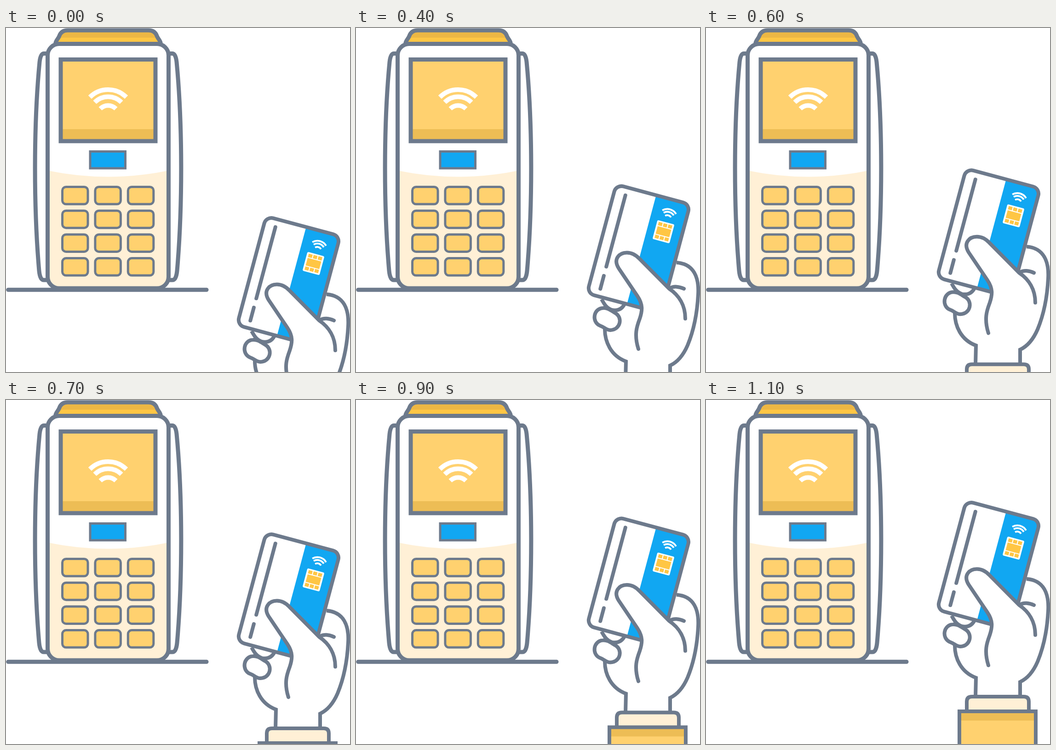
Write an HTML page that moves like this. It is 748 px wide and 748 px high and loops after 2.1 s.

```html
<!DOCTYPE html>
<html lang="en">
<head>
<meta charset="utf-8">
<title>Contactless payment</title>
<style>
  html, body { margin: 0; height: 100%; overflow: hidden; background: #fff; }
  svg { display: block; width: 100vw; height: 100vh; }
  .line { stroke: #6d7a8c; stroke-width: 9; fill: none; }
  .thin { stroke-width: 5; }
  .white { fill: #fff; }
  .cream { fill: #fff0d6; }
  .yellow { fill: #ffd16f; }
  .amber { fill: #edbd55; }
  .blue { fill: #11a7f2; }
  .round { stroke-linecap: round; stroke-linejoin: round; }
  #hand .line { stroke-width: 8; }
</style>
</head>
<body>
<svg viewBox="0 0 748 748">
  <defs>
    <path id="flap" class="line white" d="M92 55.500H82Q75 56 73 74C60 210 60 390 72 528Q74 548 82 548H92"/>
    <g id="waves" fill="none" stroke="#fff" stroke-width="10">
      <path d="M-39.600-39.600A56 56 0 0 1 39.600-39.600"/>
      <path d="M-29-28.500A41 41 0 0 1 29-28.500"/>
      <path d="M-17-14.500A24 24 0 0 1 17-14.500"/>
    </g>
    <path id="cap" d="M107.500 36C107 27 114 24 116 17C119 9 125 5 134 5H310C319 5 325 9 328 17C330 24 337 27 336.500 36"/>
    <clipPath id="capTop"><rect width="444" height="21"/></clipPath>
  </defs>

  <g id="terminal">
    <use href="#cap" fill="#ffc644"/>
    <use href="#cap" fill="#edb744" clip-path="url(#capTop)"/>
    <use href="#cap" class="line"/>
    <use href="#flap"/>
    <use href="#flap" transform="matrix(-1 0 0 1 444 0)"/>
    <rect class="white" x="90.500" y="34.500" width="263" height="531" rx="25"/>
    <path class="cream" d="M91 310Q222 337 353 310V541Q353 566 328 566H116Q91 566 91 541Z"/>
    <rect class="line" x="90.500" y="34.500" width="263" height="531.500" rx="25"/>
    <rect class="yellow" x="119" y="68.500" width="206" height="177.500"/>
    <rect class="amber" x="119" y="220" width="206" height="24"/>
    <rect class="line" x="119" y="68.500" width="206" height="177.500"/>
    <use href="#waves" x="222" y="190"/>
    <rect class="line thin blue" x="183" y="268.500" width="76.500" height="36.500"/>
    <g id="keys"></g>
    <path class="line round" d="M4.800 569.200H436"/>
  </g>

  <g id="hand">
    <path class="line white" d="M697 389C735 392 746 422 744 458C742 500 735 535 721 569C711 592 698 606 683 613V647H586L587 604C555 592 540 562 541 530L560 470"/>
    <path class="line round" d="M683 445C690 440 703 441 713 446"/>
    <path class="line white" d="M534 469C540 480 545 488 556 492C570 495 580 490 586 475"/>
    <path class="line white" d="M537 488C548 487 555 494 564 499C580 508 576 535 553 536C544 536 541 530 530 526C512 518 516 489 537 488Z"/>

    <g transform="translate(565.700 219.400) rotate(15)">
      <rect class="white" width="166.600" height="245" rx="16"/>
      <path class="blue" d="M90 0H150.600Q166.600 0 166.600 16V229Q166.600 245 150.600 245H90Z"/>
      <rect class="line" width="166.600" height="245" rx="16"/>
      <path class="line round" d="M25.500 17.500V178M25.500 198.700V228"/>
      <use href="#waves" transform="translate(127 43.700) scale(.39)"/>
      <rect class="white" x="106.800" y="51.300" width="38.200" height="42.500" rx="3"/>
      <g id="chip" fill="#ffc644"></g>
    </g>

    <path class="line white round" d="M614 577C604 545 611 527 617 511C623 493 624 480 612 462L571.500 402C558 381 573 367.500 589 367.500C600 367.500 608 372 616 380.500L681 446C702 460 716 482 716 511"/>
    <path class="line cream" d="M567 678V656Q567 645 578 645H691Q702 645 702 656V678"/>
    <rect class="yellow" x="551" y="677" width="166" height="90"/>
    <rect class="amber" x="551" y="677" width="166" height="20"/>
    <rect class="line" x="551" y="677" width="166" height="90"/>
  </g>
</svg>
<script>
  const STEP = 100, STEPS = 11, LOOP = 2100, RISE = 190;
  const hand = document.getElementById('hand');

  function addRect(parentId, attributes) {
    const rect = document.createElementNS('http://www.w3.org/2000/svg', 'rect');
    for (const name in attributes) rect.setAttribute(name, attributes[name]);
    document.getElementById(parentId).append(rect);
  }

  for (let row = 0; row < 4; row++)
    for (let col = 0; col < 3; col++)
      addRect('keys', {
        class: 'line thin yellow',
        x: 122.5 + col * 71.4, y: 345.5 + row * 51.7, width: 55.5, height: 37.5, rx: 8
      });

  for (let col = 0; col < 3; col++)
    for (const y of [54.5, 83])
      addRect('chip', { x: 110.6 + col * 10.9, y, width: 8.8, height: 7.5 });
  addRect('chip', { x: 110.6, y: 64, width: 30.6, height: 17 });

  // The hand rises in held steps, then rests until the loop restarts.
  function draw(now) {
    const step = Math.min(STEPS, Math.floor(now % LOOP / STEP));
    hand.setAttribute('transform', `translate(0 ${RISE * (1 - step / STEPS)})`);
    requestAnimationFrame(draw);
  }
  draw(performance.now());
</script>
</body>
</html>
```
